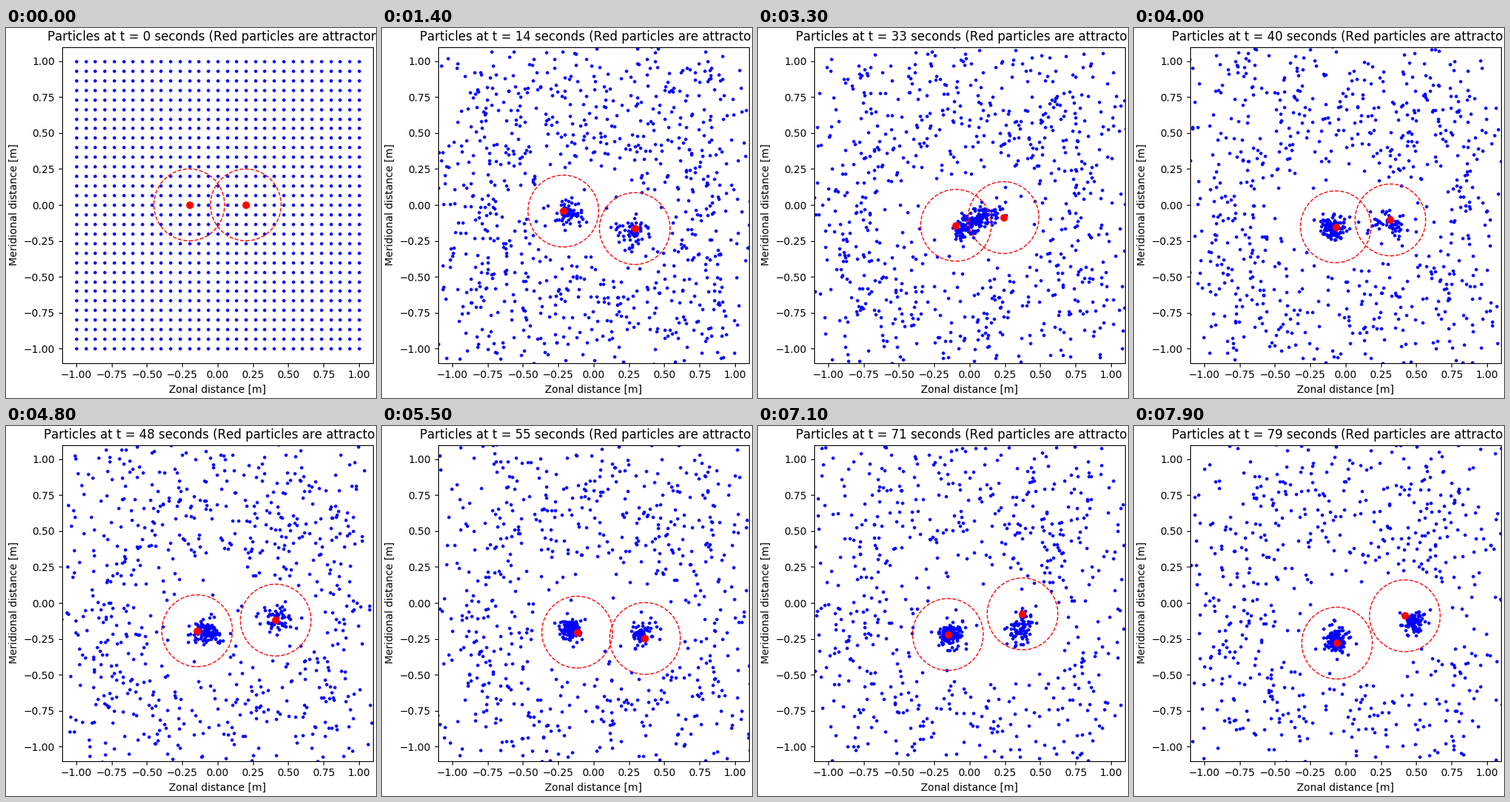
A matplotlib script that plays this animation: 500 px wide and 500 px high, repeating every 8 s.

```python
import numpy as np
import matplotlib.pyplot as plt
from matplotlib.animation import FuncAnimation

# Positions are complex numbers: zonal + meridional * 1j
STEPS = 80
REACH = 0.25                    # pull radius of an attractor
PULL = 0.04                     # pull speed per second
SIGMA = np.sqrt(2 * 0.0005)     # random step of a diffusing particle

# Evenly spaced key points of the two attractors
LEFT = [-0.2, -0.13-0.07j, -0.05-0.15j, -0.12-0.19j, -0.05-0.05j, -0.06-0.28j]
RIGHT = [0.2, 0.28-0.07j, 0.23-0.04j, 0.45-0.09j, 0.33-0.32j, 0.42-0.09j]

rng = np.random.default_rng(12)


def noise(n):
    return rng.normal(0, SIGMA, n) + 1j * rng.normal(0, SIGMA, n)


def wander(keys):
    """Random walk that passes through the key points."""
    t = np.arange(STEPS)
    key_t = np.linspace(0, STEPS - 1, len(keys)).round().astype(int)
    walk = np.cumsum(noise(STEPS))
    return walk + np.interp(t, key_t, keys - walk[key_t])


def simulate(paths):
    """Diffusing particles, drawn towards any attractor within reach."""
    side = np.linspace(-1, 1, 31)
    pos = (side + 1j * side[:, None]).ravel()
    pos = pos[np.abs(pos[:, None] - paths[0]).min(axis=1) > 1e-6]
    history = [pos]
    for centres in paths[:-1]:
        gap = centres - pos[:, None]
        dist = np.maximum(np.abs(gap), 1e-9)
        speed = np.where(dist < REACH, np.minimum(PULL, dist), 0)
        pos = pos + (speed * gap / dist).sum(axis=1) + noise(pos.size)
        history.append(pos)
    return history


def xy(z):
    return np.column_stack([z.real, z.imag])


attractors = np.column_stack([wander(LEFT), wander(RIGHT)])
particles = simulate(attractors)

plt.rcParams["text.kerning_factor"] = 6
fig = plt.figure(figsize=(5, 5), dpi=100, constrained_layout=True)
fig.get_layout_engine().set(rect=(0, 0, 1, 1.002))
ax = fig.add_subplot(xlim=(-1.1, 1.1), ylim=(-1.1, 1.1),
                     xlabel="Zonal distance [m]",
                     ylabel="Meridional distance [m]")

dots = ax.scatter([], [], c="b", s=5, zorder=1)
reds = ax.scatter([], [], c="r", s=40, zorder=2)
rings = [ax.add_patch(plt.Circle((0, 0), REACH, fc="none", ec="r", ls="--"))
         for _ in range(2)]


def draw(t):
    ax.set_title(f"Particles at t = {t} seconds (Red particles are attractors)")
    dots.set_offsets(xy(particles[t]))
    reds.set_offsets(xy(attractors[t]))
    for ring, centre in zip(rings, xy(attractors[t])):
        ring.center = centre


anim = FuncAnimation(fig, draw, frames=STEPS, interval=100, repeat=True,
                     repeat_delay=0, blit=False)
plt.show()
```
